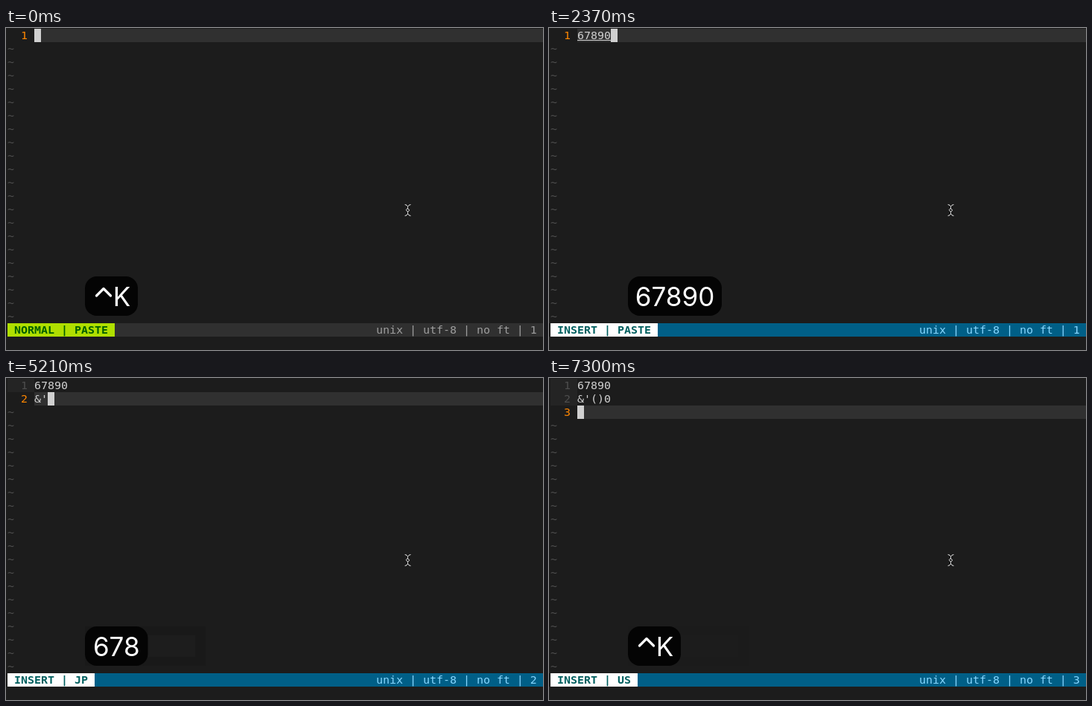
These frames come from a looping animation (721 by 433 pixels, 8000 ms). An HTML page:

```html
<!DOCTYPE html>
<html lang="en">
<head>
<meta charset="utf-8">
<title>Editor typing</title>
<style>
  html, body { margin: 0; width: 100%; height: 100%; overflow: hidden; background: #1c1c1c; }
  svg { display: block; width: 721px; height: 433px; }
  .mono { font: 14.95px "DejaVu Sans Mono", monospace; white-space: pre; }
  .bold { font-weight: bold; }
  .key { font: 400 35px Inter, sans-serif; fill: #fff; text-anchor: middle; }
</style>
</head>
<body>
<svg id="stage" viewBox="0 0 721 433" xmlns="http://www.w3.org/2000/svg">
  <rect width="721" height="433" fill="#1c1c1c"/>
  <g id="editor"></g>
  <g id="status"></g>
  <g fill="none" stroke-linecap="round">
    <path d="M539.5 239V251" stroke="#000" stroke-width="3"/>
    <path d="M536 237.5q3 .3 3.5 3q.5-2.700 3.500-3M536 252.500q3-.3 3.500-3q.5 2.700 3.500 3M539.500 240.500V243M539.500 247V250M539.500 242.500l2 2.500l-2 2.500l-2-2.500z" stroke="#eee"/>
  </g>
  <g id="ghost"></g>
  <g id="caps"></g>
</svg>
<script>
const LOOP = 8000, CELL = 9, ROW = 18, LEFT = 2, TEXT_X = 38;
const RETURN = '↩', CTRL_K = '^K';
const FADED = 0.17;

const themes = {
  NORMAL: { tab: '#afdf00', tabText: '#005f00', bar: '#303030', text: '#9e9e9e' },
  INSERT: { tab: '#ffffff', tabText: '#005f5f', bar: '#005f87', text: '#87d7ff' }
};

// Each entry changes some of the state from its time on.
const steps = [
  [0, { mode: 'NORMAL', layout: 'PASTE', lines: [''], marked: 0, key: CTRL_K, above: '',
        alpha: 1, aboveAlpha: 1, glow: 1, ghost: 0 }],
  [140, { glow: 0.75 }],
  [290, { glow: 1 }],
  [890, { mode: 'INSERT', key: 'i' }],
  [1480, { lines: ['6'], marked: 1, key: '6', above: 'i' }],
  [1630, { aboveAlpha: FADED }],
  [1780, { lines: ['67'], marked: 2, key: '67', above: '' }],
  [1930, { lines: ['678'], marked: 3, key: '678' }],
  [2220, { lines: ['6789'], marked: 4, key: '6789' }],
  [2370, { lines: ['67890'], marked: 5, key: '67890' }],
  [2670, { lines: ['67890', ''], marked: 0, key: '67890' + RETURN }],
  [3420, { alpha: FADED }],
  [3560, { key: '', ghost: 1 }],
  [3710, { layout: 'JP', key: CTRL_K, alpha: 1 }],
  [4460, { alpha: FADED + 0.03 }],
  [4610, { key: '' }],
  [4760, { lines: ['67890', '&'], key: '6', alpha: 1 }],
  [5060, { lines: ['67890', "&'"], key: '67' }],
  [5210, { key: '678' }],
  [5360, { lines: ['67890', "&'("] }],
  [5500, { key: '6789' }],
  [5650, { lines: ['67890', "&'()"] }],
  [5800, { lines: ['67890', "&'()0"], marked: 1, key: '67890' }],
  [6250, { lines: ['67890', "&'()0", ''], marked: 0, key: '67890' + RETURN, ghost: 0 }],
  [6850, { alpha: FADED }],
  [7000, { key: '', ghost: 0.25 }],
  [7300, { layout: 'US', key: CTRL_K, alpha: 1 }]
];

const layer = id => document.getElementById(id);
const escapeText = s => s.replace(/&/g, '&amp;').replace(/</g, '&lt;');
const rect = (x, y, w, h, fill, extra = '') =>
  `<rect x="${x}" y="${y}" width="${w}" height="${h}" fill="${fill}" ${extra}/>`;
const mono = (x, y, s, fill, cls = '') =>
  `<text class="mono ${cls}" x="${x}" y="${y}" fill="${fill}">${escapeText(s)}</text>`;
const line = (d, width) =>
  `<path d="${d}" fill="none" stroke="#fff" stroke-width="${width}" stroke-linejoin="round" stroke-linecap="round"/>`;

function editor({ lines, marked }) {
  let out = '';
  for (let row = 0; row < 22; row++) {
    const top = 1 + row * ROW, base = top + 14;
    if (row >= lines.length) {
      out += mono(LEFT, base, '~', '#4e4e4e');
      continue;
    }
    const text = lines[row], current = row === lines.length - 1;
    const end = TEXT_X + text.length * CELL;
    out += current
      ? rect(TEXT_X, top, 721 - TEXT_X, ROW, '#303030') + rect(end, top, CELL, ROW, '#d0d0d0')
      : rect(LEFT, top, TEXT_X - LEFT, ROW, '#242424');
    out += mono(20, base, String(row + 1), current ? '#ff8700' : '#4e4e4e');
    out += mono(TEXT_X, base, text, '#d0d0d0');
    if (current && marked) out += rect(end - marked * CELL, top + 15, marked * CELL, 1, '#d0d0d0');
  }
  return out;
}

function status({ mode, layout, lines }) {
  const theme = themes[mode], label = ` ${mode} | ${layout} `;
  return rect(LEFT, 397, 719, ROW, theme.bar) +
    rect(LEFT, 397, label.length * CELL, ROW, theme.tab) +
    mono(LEFT + CELL, 411, label.trim(), theme.tabText, 'bold') +
    mono(497, 411, `unix | utf-8 | no ft | ${lines.length}`, theme.text);
}

function cap(key, top, alpha, glow) {
  if (!key) return '';
  const digits = key.replace(RETURN, ''), hasReturn = digits !== key;
  const digitsWidth = 22.25 + digits.length * 20.75;
  let width = digitsWidth + (hasReturn ? 36 : 0), face;
  if (key === CTRL_K) {
    width = 71;
    face = line(`M121.500 ${top + 26}l9.500-9.500l9.500 9.500`, 3.2) +
      `<text class="key" x="155.500" y="${top + 40}">K</text>`;
  } else {
    if (key === 'i') width = 30;
    const middle = 106 + (key === 'i' ? width : digitsWidth) / 2;
    face = `<text class="key" x="${middle}" y="${top + 40}">${digits}</text>`;
    if (hasReturn) {
      face += line(`M232 ${top + 20}l-6 6.500l6 6.500M226 ${top + 26.5}H246.500a6 6 0 0 0 0-12H241`, 3);
    }
  }
  const round = hasReturn && alpha < 1 ? 3 : Math.min(16, width / 2);
  return `<g opacity="${alpha}">` + rect(106, top, width, 53, '#040404', `rx="${round}"`) +
    `<g opacity="${glow}">${face}</g></g>`;
}

const ghost = alpha => alpha
  ? `<g opacity="${alpha}">${rect(106, 334, 162, 53, '#191919')}${rect(117, 346, 137, 29, '#1d1d1d')}</g>`
  : '';

function draw(time) {
  const state = Object.assign({}, ...steps.filter(([at]) => at <= time).map(([, change]) => change));
  layer('editor').innerHTML = editor(state);
  layer('status').innerHTML = status(state);
  layer('ghost').innerHTML = ghost(state.ghost);
  layer('caps').innerHTML = cap(state.above, 271, state.aboveAlpha, 1) +
    cap(state.key, 334, state.alpha, state.glow);
}

const start = performance.now();
let shown = -1;
function tick() {
  const time = (performance.now() - start) % LOOP;
  const index = steps.filter(([at]) => at <= time).length;
  if (index !== shown) {
    shown = index;
    draw(time);
  }
  requestAnimationFrame(tick);
}
tick();
</script>
</body>
</html>
```
